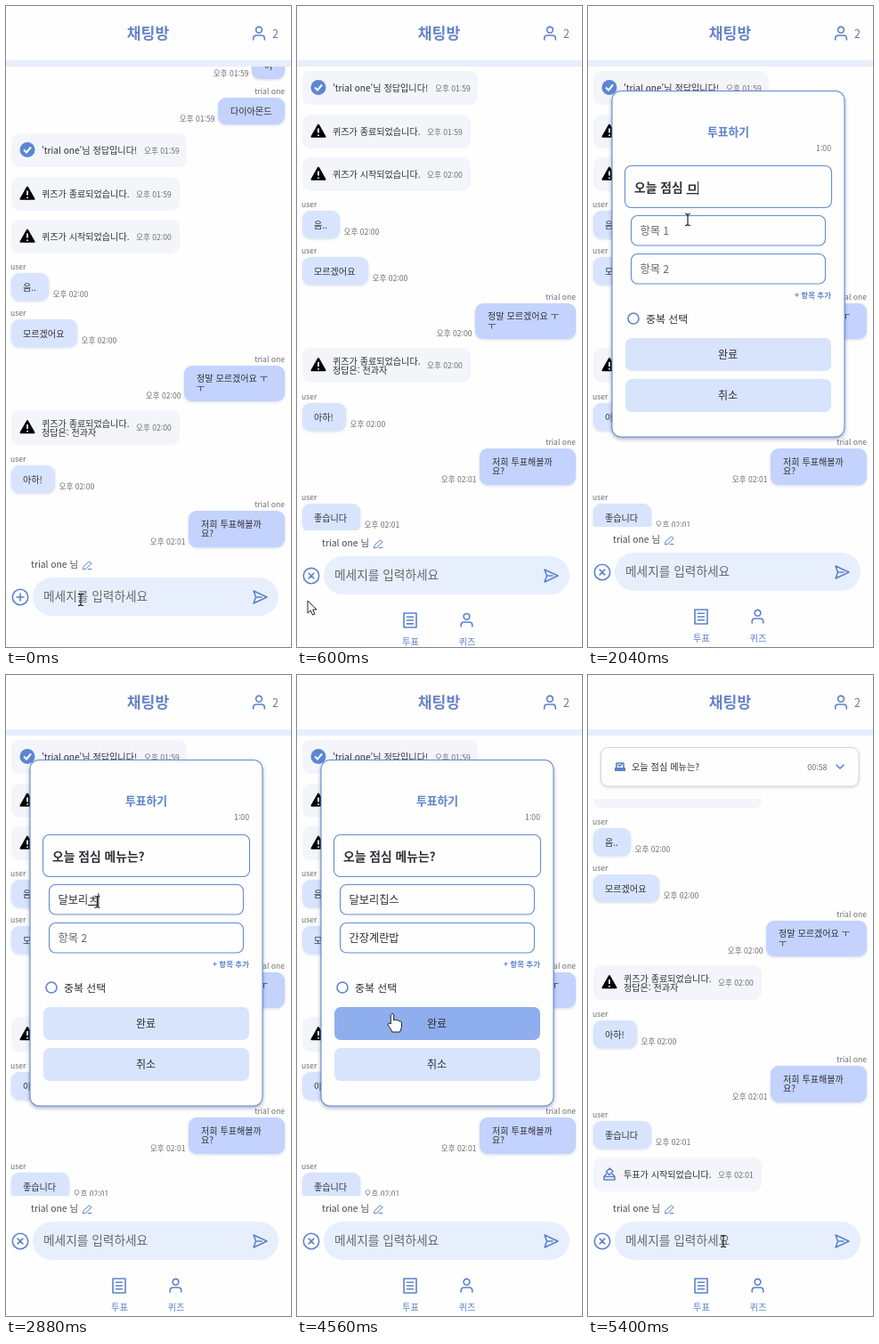
These frames come from a looping animation (320x720 px, 5.52 s). An HTML page:

```html
<!DOCTYPE html>
<html lang="ko">
<head>
<meta charset="utf-8">
<title>채팅방</title>
<style>
html, body { margin: 0; width: 100%; height: 100%; overflow: hidden; background: #fefefe; }
svg { display: block; width: 320px; height: 720px; font-family: "Noto Sans CJK KR", "Noto Sans CJK JP", sans-serif; }
.line { fill: none; stroke: #5c83cb; stroke-width: 1.6; stroke-linecap: round; stroke-linejoin: round; }
.soft { filter: drop-shadow(0 1.5px 1.5px rgba(70, 90, 150, .22)); }
</style>
</head>
<body>
<svg id="stage" viewBox="0 0 320 720"></svg>
<script>
const BLUE = '#5c83cb', GRAY = '#6c6c72', INK = '#303038';
const NAME = 'trial one', TOPIC = '오늘 점심 메뉴는?';
const STEP = 120, LOOP = 5520, KEY_MS = 43;
const MENU_AT = 420, REPLY_AT = 240, DIALOG_AT = 1080, POLL_AT = 4800;

// y is the visual middle of the line
const text = (x, y, str, size = 10.1, fill = INK, anchor = 'start', weight = 400, id = '') =>
  `<text id="${id}" x="${x}" y="${y + size * .36}" font-size="${size}" fill="${fill}" text-anchor="${anchor}" font-weight="${weight}">${str}</text>`;
const box = (x, y, right, bottom, r, fill, extra = '') =>
  `<rect x="${x}" y="${y}" width="${right - x}" height="${bottom - y}" rx="${r}" fill="${fill}" ${extra}/>`;
const at = (x, y, inner) => `<g transform="translate(${x} ${y})">${inner}</g>`;
const line = (d, extra = '') => `<path class="line" d="${d}" ${extra}/>`;
const lines = (x, y, rows) =>
  rows.map((row, i) => text(x, y + (i - (rows.length - 1) / 2) * 10.4, row)).join('');
const time = (x, y, clock, anchor) => text(x, y, '오후 ' + clock, 8.6, GRAY, anchor);

const icons = {
  person: line('M-3.4-4.2a3.4 3.4 0 1 0 6.8 0a3.4 3.4 0 1 0-6.8 0M-6.3 7v-1.6q0-3.4 3.6-3.4h5.4q3.6 0 3.6 3.4V7'),
  list: line('M-7-8H7V8H-7ZM-3.5-3.8H3.5M-3.5 0H3.5M-3.5 3.8H3.5'),
  check: `<circle r="8.5" fill="#5c86d2"/><path d="M-4 0l3 3 5-6" fill="none" stroke="#fff" stroke-width="2"/>`,
  warn: `<path d="M0-7L7.5 6.3H-7.5Z" stroke="#000" stroke-width="2" stroke-linejoin="round"/>
    <path d="M0-3V2M0 4v1.6" stroke="#fff" stroke-width="1.8"/>`,
  ballot: line('M-3.5 0L-6 3V6.5H6V3L3.5 0M-6 3H6M-3.5-2.5L.5-6.5 4-3 0 1Z'),
  ballotSmall: `<path d="M-6 1H6V5H-6Z" fill="${BLUE}"/>` + line('M-4 1V-4H4V1M-2-2L-.5-.6 2-3')
};

function system(y, bottom, icon, rows, clock, right = 195, timeX = 146) {
  const mid = (y + bottom) / 2;
  return box(6, y, right, bottom, 9, '#f4f5fb') + at(24, mid - .5, icons[icon]) +
    lines(40, mid + .8, rows) + time(timeX, mid + .8, clock);
}
function theirs(y, right, str, clock) {
  return text(5, y - 7, 'user', 8.6, GRAY) + box(6, y, right, y + 31, 9, '#d8e4fd', 'class="soft"') +
    text(19, y + 16, str) + time(right + 4.5, y + 23.5, clock);
}
function mine(x, y, bottom, rows, clock) {
  return text(313, y - 7, NAME, 8.6, GRAY, 'end') + box(x, y, 313, bottom, 9, '#c3d3fd', 'class="soft"') +
    lines(x + 14, (y + bottom) / 2, rows) + time(x - 3.5, bottom - 6, clock, 'end');
}

const messages =
  mine(276, 52, 82, ['어'], '01:59') +
  mine(238, 103, 133, ['다이아몬드'], '01:59') +
  system(143, 181, 'check', [`'${NAME}'님 정답입니다!`], '01:59', 203, 155) +
  system(192, 230, 'warn', ['퀴즈가 종료되었습니다.'], '01:59') +
  system(240, 278, 'warn', ['퀴즈가 시작되었습니다.'], '02:00') +
  theirs(300, 48, '음..', '02:00') +
  theirs(352, 80, '모르겠어요', '02:00') +
  mine(200, 404, 444, ['정말 모르겠어요 ㅜ', 'ㅜ'], '02:00') +
  system(454, 493, 'warn', ['퀴즈가 종료되었습니다.', '정답은: 전과자'], '02:00') +
  theirs(516, 55, '아하!', '02:00') +
  mine(205, 567, 608, ['저희 투표해볼까', '요?'], '02:01') +
  `<g id="reply">${theirs(629, 71, '좋습니다', '02:01')}</g>
  <g id="notice">${system(670, 708, 'ballot', ['투표가 시작되었습니다.'], '02:01')}</g>`;

const footer =
  text(28, 627.5, NAME + ' 님', 10.3, '#4a4a52') +
  at(91, 628, line('M-4.5 4.5l.6-3L2.5-4.2 5-2 -1.5 4.2ZM1 4.5H5', 'style="stroke-width:1"')) +
  at(16, 664, `<g id="plus">${line('M-8.7 0a8.7 8.7 0 1 0 17.4 0a8.7 8.7 0 1 0-17.4 0M-4 0H4M0-4V4')}</g>`) +
  box(30, 642, 306, 685, 21.5, '#e7effd') + text(42, 663.5, '메세지를 입력하세요', 13.7, '#66676d') +
  at(285, 664, line('M-7-7L8 0-7 7-4.5 0ZM-4.5 0H2')) +
  `<g id="menu">${at(127, 714, icons.list) + at(190.5, 714, icons.person) +
    text(127.5, 738.5, '투표', 10.3, BLUE, 'middle') + text(191, 738.5, '퀴즈', 10.3, BLUE, 'middle')}</g>`;

const outline = `stroke="#658bcf" stroke-width="1.1"`;
const dialog =
  box(27, 95.5, 288, 484, 10, '#fefefe', outline + ' style="filter:drop-shadow(0 2px 2px rgba(40,60,110,.4))"') +
  text(157.5, 141, '투표하기', 12.8, BLUE, 'middle', 700) + text(273, 160, '1:00', 8.7, GRAY, 'end') +
  box(41.5, 179.5, 273.5, 226.5, 7, '#fefefe', outline) +
  box(48.5, 235.5, 266.5, 269, 7, '#fefefe', outline) +
  box(48.5, 278.5, 266.5, 312, 7, '#fefefe', outline) +
  text(52, 204, '', 13.8, INK, 'start', 700, 'field0') +
  text(58.5, 252.5, '', 12.2, INK, 'start', 400, 'field1') +
  text(58.5, 295.5, '', 12.2, INK, 'start', 400, 'field2') +
  `<rect id="caret" width="1" height="15" fill="#222"/>` +
  text(273, 325, '+ 항목 추가', 8.5, BLUE, 'end', 700) +
  `<circle class="line" cx="51" cy="351" r="6"/>` + text(65, 351.5, '중복 선택', 11.9) +
  box(42, 373, 273, 410, 7, '#d7e4fc', 'id="done"') + text(157, 392, '완료', 12, INK, 'middle') +
  box(42, 419, 273, 456, 7, '#d7e4fc') + text(157, 438, '취소', 12, INK, 'middle');

const banner =
  box(14.5, 81.5, 304, 125, 8, '#fefefe', 'stroke="#d3d6de" class="soft"') +
  at(36, 103, icons.ballotSmall) + text(49, 103.5, TOPIC, 10.2, INK, 'start', 500) +
  text(268.5, 103.5, '', 8.9, GRAY, 'end', 400, 'count') + at(283, 103, line('M-4-2L0 2 4-2'));

const cursors = `
  <path id="beam" d="M-3-6.5Q0-6.5 0-5Q0-6.5 3-6.5M0-5V5M-3 6.5Q0 6.5 0 5Q0 6.5 3 6.5" fill="none" stroke="#222" stroke-width="1.2"/>
  <path id="arrow" d="M0 0V14L3.3 11 5.6 16 8 15 5.8 10H10Z" fill="#fff" stroke="#222"/>
  <path id="hand" d="M-1.7 1.5Q0-1.2 1.7 1.5V8Q3.5 6 5 8Q7 7 8 9Q10 8 10.5 10.5V15Q10 18 8.5 21H0Q-2 17-5 13Q-5 10-1.7 12Z" fill="#fff" stroke="#222"/>`;

const stage = document.getElementById('stage');
stage.innerHTML = `
  <clipPath id="view"><rect id="viewBoxRect" width="320"/></clipPath>
  <g clip-path="url(#view)"><g id="chat">${messages}</g></g>
  ${box(0, 61, 320, 68, 0, '#e7eefc')}
  ${text(159.5, 31, '채팅방', 17.2, '#6683c8', 'middle', 700)}
  ${at(284, 31, icons.person)}${text(299, 31, '2', 12.5, '#5f78b8')}
  <g id="banner">${banner}</g><g id="footer">${footer}</g><g id="dialog">${dialog}</g>
  <g id="cursor">${cursors}</g>`;
const $ = id => document.getElementById(id);
const show = (id, on) => $(id).style.display = on ? '' : 'none';

// Every state a Korean keyboard passes through while typing a string
const INITIALS = 'ㄱㄲㄴㄷㄸㄹㅁㅂㅃㅅㅆㅇㅈㅉㅊㅋㅌㅍㅎ';
function keystrokes(str) {
  const states = [['', '']];
  let head = '';
  for (const ch of str) {
    const code = ch.charCodeAt(0) - 0xAC00;
    if (code >= 0) {
      states.push([head, INITIALS[Math.floor(code / 588)]]);
      if (code % 28) states.push([head, String.fromCharCode(0xAC00 + code - code % 28)]);
      states.push([head, ch]);
    } else states.push([head + ch, '']);
    head += ch;
  }
  return states;
}

const fields = [
  { start: 1435, end: 2500, hint: '제목', value: TOPIC, caretY: 197 },
  { start: 2515, end: 3100, hint: '항목 1', value: '달보리칩스', caretY: 245 },
  { start: 3115, end: 4000, hint: '항목 2', value: '간장계란밥', caretY: 288 }
].map(f => ({ ...f, states: keystrokes(f.value) }));

const path = [
  [0, 84, 667, 'beam'], [120, 62, 666, 'beam'], [240, 22, 666, 'hand'], [360, 12, 668, 'hand'],
  [480, 12, 668, 'arrow'], [720, 12, 668, 'arrow'], [1080, 128, 683, 'hand'], [1200, 128, 683, 'hand'],
  [1320, 118, 420, 'arrow'], [1440, 112, 205, 'beam'], [1800, 112, 205, 'beam'], [2040, 112, 240, 'beam'],
  [2400, 112, 250, 'beam'], [3000, 100, 256, 'beam'], [3120, 92, 297, 'beam'], [3600, 91, 307, 'beam'],
  [4080, 91, 307, 'beam'], [4440, 107, 380, 'hand'], [4800, 107, 380, 'arrow'], [5160, 140, 560, 'arrow'],
  [5400, 152, 636, 'beam'], [LOOP, 152, 636, 'beam']
];

function drawField(f, i, t) {
  const el = $('field' + i), active = t >= f.start && t < f.end;
  const n = Math.max(0, Math.min(f.states.length - 1, Math.floor((t - f.start) / KEY_MS)));
  const [head, composing] = f.states[n];
  el.setAttribute('fill', n ? INK : '#66676d');
  el.innerHTML = n
    ? head + (active && composing ? `<tspan text-decoration="underline">${composing}</tspan>` : composing)
    : f.hint;
  if (!active) return;
  show('caret', true);
  $('caret').setAttribute('x', +el.getAttribute('x') + (n ? el.getComputedTextLength() : 0));
  $('caret').setAttribute('y', f.caretY);
}

function drawCursor(t) {
  const i = path.findLastIndex(k => k[0] <= t);
  const [t0, x0, y0, kind] = path[i], [t1, x1, y1] = path[i + 1];
  const p = (t - t0) / (t1 - t0), x = x0 + (x1 - x0) * p, y = y0 + (y1 - y0) * p;
  $('cursor').setAttribute('transform', `translate(${x} ${y})`);
  for (const id of ['beam', 'arrow', 'hand']) show(id, id === kind);
  $('done').setAttribute('fill', y > 373 && y < 410 && t > 4000 ? '#8faeee' : '#d7e4fc');
}

function draw(t) {
  const p = Math.max(0, Math.min(1, (t - MENU_AT) / 290));
  const lift = 28 * (1 - (1 - p) ** 2), polling = t >= POLL_AT;
  const scroll = polling ? 128 : t < REPLY_AT ? 0 : 52 + Math.min(18, lift);
  const top = polling ? 139 : 68;

  $('chat').setAttribute('transform', `translate(0 ${-scroll})`);
  $('viewBoxRect').setAttribute('y', top);
  $('viewBoxRect').setAttribute('height', 613 - lift - top);
  $('footer').setAttribute('transform', `translate(0 ${-lift})`);
  $('plus').setAttribute('transform', `rotate(${45 * Math.min(1, p * 1.7)})`);
  $('menu').setAttribute('opacity', Math.min(1, p * 1.7));
  show('reply', t >= REPLY_AT);
  show('notice', polling);
  show('banner', polling);
  show('dialog', t >= DIALOG_AT && !polling);
  show('caret', false);
  fields.forEach((f, i) => drawField(f, i, t));

  const left = 60 - Math.max(0, Math.floor((t - POLL_AT + STEP) / 360));
  $('count').textContent = left === 60 ? '01:00' : '00:' + left;
  drawCursor(t);
}

const begin = performance.now();
function tick() {
  const t = (performance.now() - begin) % LOOP;
  draw(Math.floor(t / STEP) * STEP);
  requestAnimationFrame(tick);
}
tick();
</script>
</body>
</html>
```
